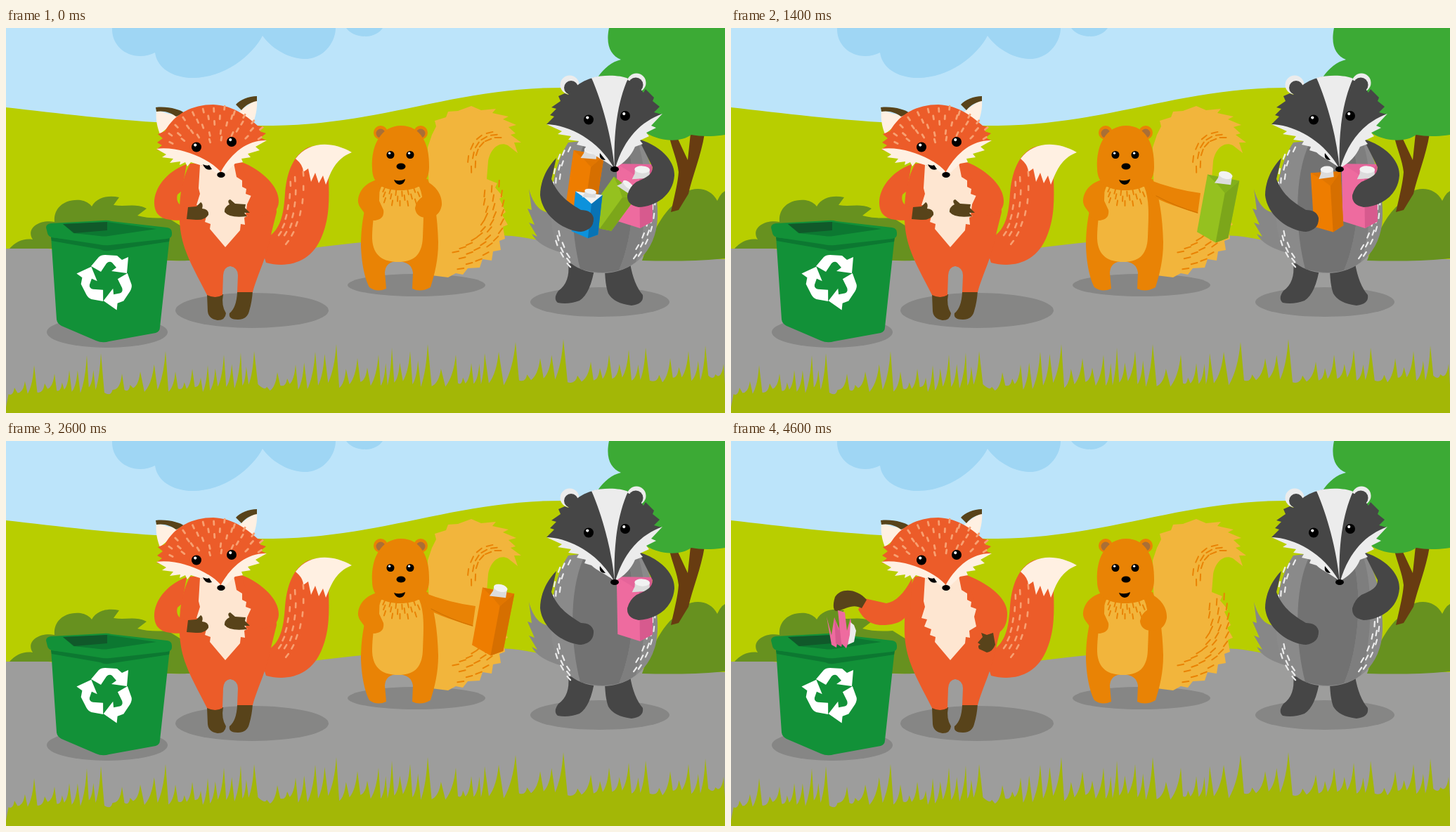
Recreate the animation shown at these times as an HTML page. Size 1023x548 px, loop 4700 ms.

```html
<!DOCTYPE html>
<html lang="en">
<head>
<meta charset="utf-8">
<title>Forest recycling</title>
<style>
html, body { margin: 0; width: 100%; height: 100%; overflow: hidden; background: #bce4fa; }
svg { display: block; width: 100%; height: 100%; }
</style>
</head>
<body>
<svg id="stage" viewBox="0 0 1023 548" preserveAspectRatio="none"></svg>
<script>
const FOX = '#ec5c29', CREAM = '#fee6d1', PALE = '#fff0e2', BROWN = '#58431a', SQ = '#e98305', GOLD = '#f2b53c',
      DARK = '#464646', WHITE = '#ececec', SHADE = '#868685';

let seed = 7;
const rnd = () => (seed = (seed * 16807) % 2147483647) / 2147483647;
const P = (fill, d) => `<path fill="${fill}" d="${d}"/>`;
const E = (fill, x, y, rx, ry = rx) => `<ellipse fill="${fill}" cx="${x}" cy="${y}" rx="${rx}" ry="${ry}"/>`;
const G = (id, body) => `<g id="${id}">${body}</g>`;
const line = (color, w, d) => `<path fill="none" stroke="${color}" stroke-width="${w}" stroke-linecap="round" d="${d}"/>`;
const eye = (x, y, r) => E('#000', x, y, r) + E('#fff', x - r * .25, y - r * .42, r * .3);

// Short fur strokes along a quadratic curve, spread sideways.
function fur(color, w, n, [x0, y0, x1, y1, x2, y2], spread, len, turn = 0) {
  let d = '';
  for (let i = 0; i < n; i++) {
    const u = (i + .5) / n, v = 1 - u;
    const a = Math.atan2(v * (y1 - y0) + u * (y2 - y1), v * (x1 - x0) + u * (x2 - x1));
    const off = spread * ((i % 3) - 1 + rnd() * .4 - .2);
    const x = v * v * x0 + 2 * u * v * x1 + u * u * x2 - Math.sin(a) * off;
    const y = v * v * y0 + 2 * u * v * y1 + u * u * y2 + Math.cos(a) * off;
    const dx = Math.cos(a + turn) * len / 2, dy = Math.sin(a + turn) * len / 2;
    d += `M${(x - dx).toFixed(1)},${(y - dy).toFixed(1)}l${(2 * dx).toFixed(1)},${(2 * dy).toFixed(1)}`;
  }
  return line(color, w, d);
}

function foxFur() {
  let d = '';
  for (let ring = 0; ring < 5; ring++) {
    const r = 36 + ring * 11, span = [12, 28, 48, 59, 52][ring], n = [2, 4, 7, 10, 11][ring];
    for (let i = 0; i < n; i++) {
      const a = (-93 + span * (2 * i / (n - 1) - 1)) * Math.PI / 180;
      const c = Math.cos(a), s = Math.sin(a), q = r + rnd() * 5 - 2;
      d += `M${(300 + c * q).toFixed(1)},${(198 + s * q).toFixed(1)}l${(c * 5).toFixed(1)},${(s * 5).toFixed(1)}`;
    }
  }
  return line('#f8a071', 2.8, d);
}

function grass() {
  const tips = [12,512, 40,480, 55,506, 69,492, 90,487, 115,466, 135,463, 165,492, 191,489, 227,460, 241,489,
    265,485, 287,480, 310,465, 334,462, 353,460, 386,490, 412,479, 440,461, 470,450, 500,470, 530,465, 549,455,
    575,460, 600,450, 640,465, 662,477, 681,463, 725,447, 760,470, 793,443, 832,475, 858,465, 886,458, 910,455,
    945,470, 971,460, 995,452, 1021,478];
  let d = 'M0,548V540', px = 0;
  const blade = (x, y) => {
    const gap = x - px, low = 524 - x * .02 - rnd() * 10;
    d += `L${px + gap * .3},${low}Q${x - gap * .15},${(low + y) / 2 + 8} ${x},${y}`;
    px = x;
  };
  for (let i = 0; i < tips.length; i += 2) {
    const x = tips[i], y = tips[i + 1];
    if (x - px > 17) blade((px + x) / 2 + rnd() * 4 - 2, y + 14 + rnd() * 10);
    blade(x, y);
  }
  return P('#a3b706', d + 'L1023,508V548Z');
}

const scenery = () =>
  P('#bce4fa', 'M0,0H1023V548H0Z') +
  P('#9fd6f4', 'M151,0C150,22 167,40 191,40Q202,40 212,35C215,57 237,71 266,71C310,71 350,40 365,11C380,32 406,45 429,44C456,41 469,17 469,0Z' +
    'M484,0C490,8 500,12 512,12C523,12 532,6 536,0Z') +
  P('#b8ce00', 'M0,113C100,124 200,139 380,139C540,136 640,85 790,85H1023V345H0Z') +
  P('#9d9d9c', 'M0,314H60C150,328 200,332 260,331C360,328 430,311 520,304C600,300 680,293 720,296C780,303 860,330 1023,329V548H0Z') +
  P('#67911f', 'M5,314C14,304 25,299 38,301C28,286 46,272 69,276C67,254 86,243 106,245Q117,247 122,254C130,240 146,238 161,241L153,252C170,255 186,249 200,257L187,267Q205,272 230,270L262,290V331C200,333 130,322 80,314Z') +
  P('#67911f', 'M905,331C920,290 935,262 953,249C965,224 1000,222 1012,246Q1017,235 1023,232V328C985,332 940,332 905,331Z') +
  P('#683c11', 'M944,156L956,158L970,188L974,150H994C989,182 976,212 971,236L957,259L946,262C951,240 956,220 957,205C955,188 948,173 944,156Z') +
  P('#3caa35', 'M858,0C853,24 860,39 875,45C862,48 851,57 842,70L846,102C860,120 895,130 912,150C932,162 960,163 975,152C990,155 1010,154 1023,152V0Z');

const bin = () => {
  const arrow = 'M121,339L132,326Q135,323 141,323L158,324L165,330L174,326L172,349L150,346L157,341L151,334Q147,331 143,335L135,347Z';
  return E(SHADE, 144, 433, 86, 22) +
    P('#129138', 'M64,296L72,415Q73,421 79,424L128,445Q137,449 147,446L213,434Q219,432 219,426L233,296Z') +
    P('#0c7831', 'M64,298L140,307L233,298L232,304L146,317Q140,318 134,315L65,303Z') +
    P('#129138', 'M57,284Q57,279 64,278L138,274Q144,273 150,275L229,284Q236,285 236,291V294Q236,299 229,300L148,309Q140,310 132,308L66,298Q60,297 59,292Z') +
    P('#0c7831', 'M81,279L144,276L214,286L146,296Q140,297 133,296L96,292Z') +
    P('#10592a', 'M81,279L144,276V288L97,292Z') +
    [0, 120, 240].map(a => `<g transform="rotate(${a} 144 359)">${P('#fff', arrow)}</g>`).join('');
};

const fox = () =>
  E(SHADE, 350, 402, 109, 25) +
  P(FOX, 'M360,303C390,295 395,268 397,235C400,202 410,180 430,170C452,163 475,168 490,177C470,185 462,200 459,215C460,245 460,270 450,295C435,335 400,342 370,334Z') +
  P(PALE, 'M412,186C430,162 462,160 492,177C474,184 466,197 460,211L455,223L451,210L445,221L440,206L434,219L430,200L423,205Q423,195 412,186Z') +
  fur('#f8a071', 2.6, 19, [412, 205, 418, 270, 392, 302], 9, 6) +
  P(BROWN, 'M286,379H309Q306,395 313,406Q312,416 301,416Q288,414 287,403ZM330,374H351Q350,390 346,403Q343,415 330,415Q316,415 318,406Q328,398 329,376Z') +
  P(FOX, 'M262,193C250,215 246,240 247,275C249,315 266,340 286,380Q298,386 308,380L309,352Q310,340 319,339Q330,341 330,352L329,376H351C358,350 372,325 378,290L385,262C384,230 360,195 330,190Z') +
  P(CREAM, 'M276,195L274,228L276,236L271,252L279,254L275,264L285,268L283,276L291,279L290,286L312,312L333,288L334,279L340,280L339,270L349,264L346,250L349,239L341,236L342,229L336,226L336,217L328,212L324,192Z') +
  G('foxLeftRest', P(FOX, 'M257,194C226,205 210,231 211,250C212,270 226,276 259,273L260,255C247,255 241,247 244,237L250,232Z') +
    P(BROWN, 'M259,255L271,254L277,248Q281,250 279,257Q289,258 288,266Q283,274 270,273L257,272Z')) +
  G('foxLeftHold', P(FOX, 'M257,194C226,205 210,231 211,250L220,262L241,258L250,232Z') +
    P(BROWN, 'M218,268Q215,280 226,285Q240,288 243,278L242,266Z')) +
  G('foxLeftDrop', P(FOX, 'M258,194C248,215 235,229 221,231L190,224L181,240C190,256 201,262 215,262C236,262 248,256 255,240Z') +
    P(BROWN, 'M193,226C180,210 156,208 148,222C144,235 146,242 150,242C165,239 173,231 186,238Z')) +
  G('foxRightRest', P(FOX, 'M335,191C366,203 388,226 388,246C388,263 375,269 341,267L343,251L350,236Z') +
    P(BROWN, 'M341,251L326,250L319,244Q314,245 318,251Q310,255 311,262Q318,271 343,268L339,263L347,263L340,256Z')) +
  G('foxRightLow', P(FOX, 'M335,191C372,205 393,226 393,245C393,262 388,270 374,277L357,278L350,240Z') +
    P(BROWN, 'M373,273L376,290Q372,300 364,301L353,296Q350,290 355,290L351,287L358,279L356,273L364,276Z')) +
  P(PALE, 'M214,117C225,120 235,124 244,124L236,137L219,151C214,138 213,128 214,117ZM357,100C358,115 355,128 350,138L332,119C340,112 350,107 357,100Z') +
  P(BROWN, 'M213,113C230,111 248,116 254,121L242,126C235,121 225,117 214,119ZM357,97C345,97 333,102 327,109L335,117C340,110 350,105 357,104Z') +
  P(FOX, 'M214,173L222,167L215,163L223,157L216,151L226,147C240,122 265,109 295,109C325,110 345,128 358,139L366,141L361,147L370,150L362,156L370,160C350,165 330,175 318,188L306,205L262,190Z') +
  P(PALE, 'M214,172C242,168 285,182 305,204L300,207Q286,196 276,195L263,191L258,197L255,191L247,195L248,190L233,192L238,186L222,184L228,180Z' +
    'M371,160C345,159 322,176 306,204L311,207L326,193L337,191L335,186L348,184L344,179L361,174L355,169Z') +
  foxFur() +
  P('#000', 'M280,194Q286,197 289,195L293,201Q284,204 280,194Z') +
  E('#000', 306, 209, 5.7, 4) + eye(271, 169.5, 7) + eye(321, 162, 7);

const squirrel = () =>
  E(SHADE, 584, 366, 98, 16) +
  P(GOLD, 'M600,170L606,152L612,140L610,132L626,127L629,119L643,118L662,111L676,117L697,115L692,121L715,126L707,130L726,138L715,141L725,150L718,152L733,163L723,163L728,178L714,167C700,160 688,175 686,190L684,215L699,221L696,227L707,240L702,243L711,262L706,266L714,280L707,283L710,300L702,303L704,316L693,318L691,331L678,329L674,341L657,342L650,351L640,349L629,355L605,352Z') +
  fur(SQ, 2, 14, [703, 152, 660, 150, 663, 205], 5, 9) +
  fur(SQ, 2, 34, [690, 222, 712, 300, 640, 334], 12, 9, .3) +
  E(SQ, 533, 149, 10) + E('#a96f36', 533, 150, 6.5) + E(SQ, 590, 149, 10) + E('#a96f36', 590, 150, 6.5) +
  P(SQ, 'M530,215C510,240 505,280 505,310C506,340 512,360 517,369Q528,377 541,371L539,348Q540,332 558,332Q577,333 579,348L578,371Q590,377 604,369C610,350 615,330 615,305C614,270 610,240 600,215Z') +
  P(GOLD, 'M534,226C524,250 521,280 521,300C522,325 538,333 558,333C578,333 592,325 593,298C594,270 596,245 588,226Z') +
  fur(SQ, 2, 17, [533, 236, 560, 249, 589, 236], 7, 7, Math.PI / 2) +
  G('sqLeftRest', P(SQ, 'M532,215C510,219 500,235 501,248C503,258 511,261 511,268Q514,274 525,274Q539,272 537,259L531,246Z')) +
  G('sqLeftReach', P(SQ, 'M533,216L478,237Q474,244 480,250L488,264L527,250Z')) +
  G('sqLeftWide', P(SQ, 'M535,216C502,210 486,224 487,240C489,255 497,262 505,268L537,256Z')) +
  G('sqRightReach', P(SQ, 'M592,215Q630,230 668,235L664,264C640,256 620,250 600,240Z') +
    line('#cd7000', 1, 'M605,239Q635,255 664,263')) +
  G('sqRightRest', P(SQ, 'M590,215C612,222 621,238 620,252C618,264 611,270 599,270Q584,270 582,257Q583,246 593,240Z')) +
  `<g id="sqItem"></g>` +
  P(SQ, 'M521,200C519,165 535,139 562,139C590,139 603,165 602,198C602,222 585,231 561,231C537,231 521,222 521,200Z') +
  eye(547, 180.5, 5.5) + eye(575, 180.5, 5.5) + E('#000', 562, 197, 6.5, 4.5) +
  P('#000', 'M552,216Q560,219 568,215Q567,222 560,223Q554,222 552,216Z');

const badger = () =>
  E(SHADE, 845, 390, 99, 21) +
  P('#878787', 'M744,229C750,252 762,264 775,262L792,320C770,314 755,306 748,293L756,297L744,277L752,280L742,257L748,259Z') +
  P(DARK, 'M800,335Q803,362 786,374Q778,385 785,391Q800,394 816,388Q832,378 838,338ZM852,338Q852,365 857,378Q865,392 890,395Q908,393 906,380Q893,365 888,335Z') +
  P('#8a8a8a', 'M800,163C775,200 772,260 778,290C785,330 815,349 848,349C890,349 925,320 927,270C928,220 915,175 895,152Z') +
  P('#727272', 'M824,162C800,210 803,290 817,343Q848,352 872,345C892,300 900,220 884,165Z') +
  P('#7e7e7e', 'M884,165C900,220 892,300 872,345Q886,341 896,333C912,290 915,205 898,160Z') +
  fur(WHITE, 2.2, 9, [799, 167, 782, 200, 783, 226], 4, 7) +
  fur(WHITE, 2.2, 9, [783, 290, 788, 318, 806, 337], 4, 7) +
  fur(WHITE, 2.2, 14, [919, 245, 922, 290, 893, 328], 4, 7) +
  `<g id="stack"></g>` +
  P(DARK, 'M783,185C768,200 760,220 760,238C763,268 795,289 818,290Q837,287 836,270Q833,259 818,259C800,248 785,238 776,215Z') +
  P(DARK, 'M900,158C938,170 952,194 951,210C949,238 925,254 900,255Q883,252 884,238Q887,226 897,219C912,213 920,208 920,198Z') +
  E(WHITE, 802, 81, 13.5) + E(WHITE, 897, 78, 13.5) + E(DARK, 804, 85, 10) + E(DARK, 896, 81, 10.5) +
  P(DARK, 'M795,93L786,97L789,104L776,113L783,115L774,124L780,126L769,137C800,140 840,165 863,200H868C885,165 905,140 933,123L922,120L930,112L920,104L922,99L910,87L907,92C895,75 875,68 855,68C830,69 812,78 800,95Z') +
  P(WHITE, 'M769,137C802,138 843,160 865,199C852,188 841,185 833,177L823,174L825,169L812,166L815,161L800,159L804,154L785,151L791,147Z' +
    'M934,122C904,133 880,156 867,199Q887,188 895,169L906,165L902,160L915,154L911,149L925,142L918,139Z' +
    'M833,71C850,66 875,67 885,72C870,105 864,150 866,201C862,155 848,105 833,71Z') +
  P('#000', 'M845,178Q843,188 853,188Z') + E('#000', 866, 201, 6, 4) + eye(829, 130.5, 7) + eye(881, 125, 7);

const cartons = [
  { start: 100, color: '#0c92dc', dark: '#0873b5', top: '#f2f2f2', cap: [1, -46], size: .75, rest: [825, 265, 10, .88, .72], high: 124 },
  { start: 1200, color: '#95c11f', dark: '#7ca61a', top: '#83b01b', cap: [1, -46], size: .9, rest: [861, 251, 40, .98, .8], high: 115 },
  { start: 2400, color: '#ee7d00', dark: '#d66f00', top: '#e17600', cap: [1, -46], size: 1, rest: [822, 217, 12, 1, .95], high: 165 },
  { start: 3600, color: '#ee6b9f', dark: '#d75a8e', top: '#e5649a', cap: [9, -35], size: 1, rest: [893, 237, 3, 1.15, 1.03], high: 162 }
];

const carton = c =>
  P(c.color, 'M-23,-41L21,-43L25,36L10,46L-18,38Z') +
  P(c.dark, 'M6,-22L21,-43L25,36L10,46Z') +
  P(c.top, 'M-23,-41L21,-43L6,-22L-6,-31Z') +
  `<g transform="translate(${c.cap})">${P('#dcdcdc', 'M-9,0V6L-12,14L10,11L9,0Z')}${E('#f2f2f2', 0, 0, 9.5, 5)}</g>`;

const crushed = c =>
  P(c.color, 'M-21,-18L-14,22L-7,26L-3,0L-10,-17L-14,8Z') +
  P(c.dark, 'M-10,-17L-8,20L0,25L6,0L0,-27L-4,2Z') +
  P(c.color, 'M-5,-27L5,-24L8,2L13,-16L16,2L7,27L0,20Z') +
  P('#ececec', 'M13,-10L18,-6L21,2L18,18L9,22L12,8Z');

const $ = id => document.getElementById(id);
$('stage').innerHTML = scenery() + bin() + fox() + squirrel() + badger() + grass() + '<g id="loose"></g>';

const show = (id, on) => $(id).setAttribute('display', on ? 'inline' : 'none');
const place = (art, [x, y, r, sx, sy = sx]) =>
  `<g transform="translate(${x} ${y}) rotate(${r}) scale(${sx} ${sy})">${art}</g>`;

// Ten steps a second: badger tosses, squirrel crushes, fox drops into the bin.
function route(c, k) {
  return [
    [765, (c.high + 215) / 2, -10, 1], [724, c.high, -25, 1], [691, 256, 14, 1.05],
    [590, 256, 50, 1.05], [544, 260, 82, 1.13, 1.02], [530, 259, 86, .7, .7],
    [479, 259, 0, .57], [425, 257, -20, .65], [312, 260, -10, .75 * c.size],
    [230, 263, 0, .93 * c.size], [157, 268, 0, c.size]
  ][k];
}

function draw(ms) {
  const t = Math.floor((ms % 4700) / 100) * 100;
  let step = -1, held = '', loose = '', stack = '';
  for (const c of cartons) {
    const k = (t - c.start) / 100;
    if (k >= 0 && k < 12) step = k;
    if (k >= 0 && k < 11) {
      const art = place(k < 6 ? carton(c) : crushed(c), route(c, k));
      if (k > 2 && k < 6) held = art; else loose += art;
    }
  }
  for (const i of [3, 2, 1, 0]) {
    const c = cartons[i];
    if (t < c.start) stack += place(carton(c), i === 2 && t >= 1200 ? [847, 246, 0, .97] : c.rest);
  }
  const sqReach = step === 1 || step === 2, sqGive = step === 6 || step === 7, sqCrush = step > 2 && step < 6;
  const drop = step === 10, hold = step === 9 || step === 11;
  show('sqRightReach', sqReach);
  show('sqRightRest', !sqReach);
  show('sqLeftReach', sqGive);
  show('sqLeftWide', sqCrush);
  show('sqLeftRest', !sqGive && !sqCrush);
  show('foxLeftDrop', drop);
  show('foxLeftHold', hold);
  show('foxLeftRest', !drop && !hold);
  show('foxRightLow', drop);
  show('foxRightRest', !drop);
  $('sqItem').innerHTML = held;
  $('loose').innerHTML = loose;
  $('stack').innerHTML = stack;
}

const begin = performance.now();
function tick() {
  draw(performance.now() - begin);
  requestAnimationFrame(tick);
}
tick();
</script>
</body>
</html>
```
